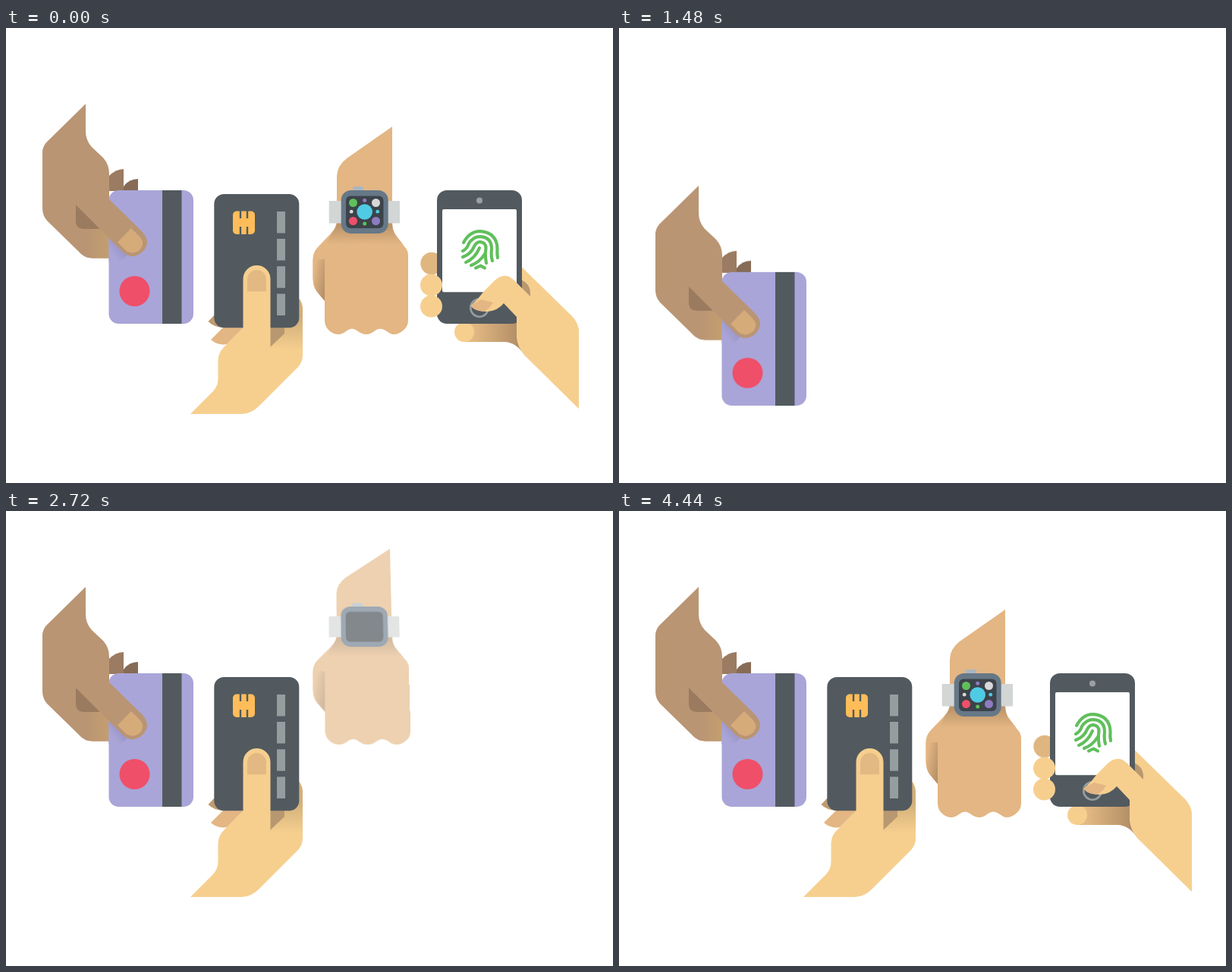
Recreate the animation shown at these times as an HTML page. Size 800 by 600 pixels, loop 4480 ms.

```html
<!DOCTYPE html>
<html lang="en">
<head>
<meta charset="utf-8">
<title>Ways to pay</title>
<style>
  html, body { margin: 0; width: 100%; height: 100%; overflow: hidden; background: #fff; }
  #stage { position: fixed; left: 0; top: 0; width: 100%; height: 100%; overflow: hidden; contain: strict; }
  svg { position: absolute; left: 0; top: 0; width: 800px; height: 600px; overflow: hidden; transform-origin: 400px 300px; }
  .dark { fill: #525a5f; }
  .tan { fill: #e3b683; }
  .skin { fill: #f6cf8f; }
  .grey { fill: #959e9f; }
  .print path { fill: none; stroke-width: 4; stroke-linecap: round; stroke-linejoin: round; }
</style>
</head>
<body>
<div id="stage">
<svg viewBox="0 0 800 600">
  <defs>
    <linearGradient id="fade" x2="0" y2="1">
      <stop stop-color="#525a5f" stop-opacity=".35"/>
      <stop offset="1" stop-color="#525a5f" stop-opacity="0"/>
    </linearGradient>
  </defs>
  <rect id="trail" x="206" y="389" width="25.5" height="110" fill="url(#fade)"/>
</svg>

<svg id="swipe" viewBox="0 0 800 600">
  <defs>
    <linearGradient id="palm1">
      <stop offset=".25" stop-color="#b99574"/>
      <stop offset="1" stop-color="#c49e6f"/>
    </linearGradient>
    <linearGradient id="shade1" x1="1" y1="0" x2="0" y2="1">
      <stop offset=".3" stop-color="#9a93c4"/>
      <stop offset=".75" stop-color="#a9a5d8"/>
    </linearGradient>
  </defs>
  <path fill="#9b7b62" d="M135 215V196Q144 186 155 186V215Z"/>
  <path fill="#866b56" d="M155 215V209Q162 199 174 199V215Z"/>
  <path fill="#b99574" d="M105 100L53 151Q48 157 48 164V238Q48 247 54 254L97 296Q104 303.500 114 303.500H136V192Q136 180 128 171L113 157Q105 148 105 136Z"/>
  <path fill="url(#palm1)" d="M97 265H136V303.500H114Q104 303.500 97 296Z"/>
  <rect x="135.500" y="214" width="111.500" height="176" rx="13" fill="#a9a5d8"/>
  <rect class="dark" x="206" y="214" width="25.500" height="176"/>
  <circle cx="169.500" cy="347" r="20" fill="#ef4f69"/>
  <path fill="url(#shade1)" d="M135.500 276L160 299Q153 309 143 308H135.500Z"/>
  <path fill="#9b7b5f" d="M92 233V254Q92 265 103 265H126Z"/>
  <path fill="#b99574" d="M92 233L153 294.500Q166 307 179 296Q193 283 179 268L135.500 225.500V192L110 200Z"/>
  <path fill="#d6ab7a" d="M147 282.500L165 264L175.500 274.500Q184 283 177.500 291.500Q168 300 158.500 294Z"/>
</svg>

<svg id="insert" viewBox="0 0 800 600">
  <defs>
    <linearGradient id="palm2" x2="0" y2="1">
      <stop offset=".4" stop-color="#d2b07b"/>
      <stop offset="1" stop-color="#f6cf8f"/>
    </linearGradient>
  </defs>
  <path class="skin" d="M386 356Q391 362 391 372V432Q391 440 385 447L334 498Q323 509 311 509H243L273 479Q279.500 472 279.500 462V438Q280 428 287 421L313 395V370H386Z"/>
  <path fill="url(#palm2)" d="M348 358H387Q391 364 391 372V425H348Z"/>
  <path fill="#b89870" d="M348 394H367V403L348 421Z"/>
  <path fill="#c09a70" d="M276 377L266.500 387Q273 394 286 395Z"/>
  <path class="tan" d="M270 411L287 394H314L291 417Q279 419 270 411Z"/>
  <rect class="dark" x="274.300" y="219" width="112" height="176.300" rx="13"/>
  <rect x="299" y="241.500" width="29" height="30.500" rx="5" fill="#ffbd5a"/>
  <rect id="chipGlow" x="299" y="241.500" width="29" height="30.500" rx="5" fill="#fff"/>
  <path stroke="#525a5f" stroke-width="2.400" d="M309 241V251M318 241V251M309 262V272.500M318 262V272.500"/>
  <path class="grey" d="M357 242h11v28.500h-11zM357 278h11v28.500h-11zM357 314.300h11v28.500h-11zM357 350.500h11v28.500h-11z"/>
  <path class="skin" d="M312.500 331a18 18 0 0 1 36 0V421L330 450L300 440L300 408L312.500 395.500Z"/>
  <path fill="#e3b983" d="M318 347.500V331.500a12.500 12.500 0 0 1 25 0V347.500Z"/>
</svg>

<svg id="wrist" viewBox="0 0 800 600">
  <defs>
    <linearGradient id="shade3" x2="0" y2="1">
      <stop offset=".2" stop-color="#bd966b"/>
      <stop offset="1" stop-color="#e3b683"/>
    </linearGradient>
    <linearGradient id="side3" x1="0" x2="1" y1="0" y2=".7">
      <stop offset=".2" stop-color="#e3b683"/>
      <stop offset="1" stop-color="#b8926a"/>
    </linearGradient>
  </defs>
  <path class="tan" d="M509 130L449 172Q436 182 436 196V252Q436 262 430 269L411 289Q404.500 296 404.500 304V329Q404.500 341 410 348L420 360V386Q420 394 427 400Q438 408 448 400Q456 393 464 400Q475 408 485 400Q493 393 502 400Q511 408 522 400Q530 394 530 386V300Q530 293 525 288L515 275Q509 268 509 258Z"/>
  <path fill="url(#side3)" d="M404.500 305H420V360L410 348Q404.500 341 404.500 329Z"/>
  <path fill="url(#shade3)" d="M436 256H509Q509 268 515 275L523 285H422L430 269Q436 262 436 256Z"/>
  <rect x="425.700" y="228" width="93.300" height="29.500" fill="#d2d6d5"/>
  <rect x="457" y="209" width="14" height="10" rx="2" fill="#a9b6c0"/>
  <rect x="441.700" y="214" width="62" height="57" rx="13" fill="#667887"/>
  <rect x="448" y="221.500" width="49.500" height="42.500" rx="6" fill="#3c434a"/>
  <g id="dots"></g>
</svg>

<svg id="touch" viewBox="0 0 800 600">
  <defs>
    <linearGradient id="palm4">
      <stop offset=".15" stop-color="#e3b983"/>
      <stop offset="1" stop-color="#ab8862"/>
    </linearGradient>
  </defs>
  <circle cx="561" cy="310.500" r="14.700" fill="#e0b680"/>
  <path fill="url(#palm4)" d="M604 388H684V432Q672 414 657 414H604Z"/>
  <circle class="skin" cx="604" cy="401" r="13"/>
  <path class="skin" d="M679 314.500L745 379Q755 389 755 402V502L684 432V380H679Z"/>
  <path id="fold" fill="#b89870" d="M679 332Q690 337 691 348V356L679 346Z"/>
  <rect class="dark" x="568" y="214" width="112" height="176" rx="13"/>
  <circle cx="624" cy="227.500" r="4" fill="#9a9fa1"/>
  <rect x="575" y="239" width="98" height="109.300" rx="2" fill="#fff"/>
  <circle cx="624" cy="369" r="11.700" fill="none" stroke="#959e9f" stroke-width="2.600"/>
  <g class="print" id="base" stroke="#d9d9d9">
    <path d="M603 283Q611 268 625 268Q647 270 647.500 291Q647 298 648 303"/>
    <path d="M602 294Q608 291 610 284Q616 275 625 275Q640 276 640 291Q639 301 641 307"/>
    <path d="M602 302Q613 298 617 288Q620 282 625 282Q633 283 632.500 291Q631 298 633 310"/>
    <path d="M606 309Q618 304 624 290"/>
    <path d="M613 313Q624 309 631 298"/>
    <path d="M619 316.500L625.500 313.500L631 316.500"/>
  </g>
  <g class="print" id="ink" stroke="#5fc05a"></g>
  <circle class="skin" cx="560.500" cy="339" r="14.500"/>
  <circle class="skin" cx="560.500" cy="367" r="14.500"/>
  <path id="thumb" class="skin"/>
  <path id="nail" class="tan"/>
</svg>
</div>

<script>
const LOOP = 4480;
const $ = id => document.getElementById(id);
const clamp = v => Math.min(1, Math.max(0, v));
const mix = (a, b, p) => a + (b - a) * p;
const span = (t, start, length) => clamp((t - start) / length);
const inOut = (u, n = 4) => u < .5 ? Math.pow(2 * u, n) / 2 : 1 - Math.pow(2 - 2 * u, n) / 2;
const backOut = (u, c = 2.8) => 1 + (c + 1) * (u - 1) ** 3 + c * (u - 1) ** 2;

// Entrances: tilt in degrees around the height pivot, shift in pixels, gain of the fade-in
const hands = [
  { el: $('swipe'),  start: 840,  time: 720, pivot: 245, tilt: 25,  from: 0,    to: 108, gain: 1.5, next: [1460, 280] },
  { el: $('insert'), start: 1602, time: 560, pivot: 300, tilt: -25, from: 75.5, to: 50,  gain: 1.5, next: [2220, 400] },
  { el: $('wrist'),  start: 2413, time: 640, pivot: 267, tilt: 25,  from: -159, to: 0,   gain: 1.5 },
  { el: $('touch'),  start: 2998, time: 500, pivot: 358, tilt: -25, from: 72,   to: 0,   gain: 2.4, side: 10 }
];

function place(hand, t, alpha) {
  const p = inOut(span(t, hand.start, hand.time));
  const q = hand.next ? inOut(span(t, ...hand.next)) : 0;
  const y = mix(mix(hand.from, hand.to, p), 0, q);
  const x = (hand.side || 0) * (1 - p);
  const tilt = hand.tilt * (1 - p);
  const off = hand.pivot - 300;
  const still = Math.abs(x) + Math.abs(y) + Math.abs(tilt) < .02;
  hand.el.style.transform = still ? 'none'
    : `perspective(1200px) translate(${x}px, ${y + off}px) rotateX(${tilt}deg) translateY(${-off}px)`;
  hand.el.style.opacity = clamp(hand.gain * p) * alpha;
  return y;
}

const NS = 'http://www.w3.org/2000/svg';
const dots = [
  [0, 0, 10.3, '#4fcbe4'],
  [-15.2, -12, 5.5, '#5fc05a'], [14.8, -12, 5.5, '#d8d8d8'],
  [-15.2, 12, 5.5, '#ef4f69'], [14.8, 12, 5.5, '#8f7cc0'],
  [0, -15.3, 2.5, '#8f7cc0'], [-17.5, -.3, 2.4, '#d8d8d8'],
  [17, -.3, 2.4, '#4fcbe4'], [0, 15.5, 2.5, '#5fc05a']
].map(([x, y, r, color]) => {
  const el = document.createElementNS(NS, 'circle');
  el.setAttribute('fill', color);
  $('dots').append(el);
  return { el, x, y, r };
});

function drawDots(t) {
  dots.forEach(({ el, x, y, r }, i) => {
    const f = Math.max(0, backOut(span(t, 2930 + i * 12, 500)));
    el.setAttribute('cx', 472.7 + x * f);
    el.setAttribute('cy', 242.5 + y * f);
    el.setAttribute('r', r * Math.min(1, f));
  });
}

// Thumb outline, resting and pressing
const rest = [630,306, 633,304, 642,305.5, 664,312, 675,314, 681,316.6, 697,333.5, 667,368, 664,346, 661,335, 648,330, 634,322];
const press = [613,366, 622,358, 630,347, 644,333, 657,321, 669,332, 691,354, 673,381, 656,363, 648,373, 634,374, 619,374];
const nailRest = [630,306, 635,305, 639,306, 659,311.5, 657,321, 655,325, 640,319.5];
const nailPress = [612,366, 620,362, 626,358, 642,362, 635,374, 627,373.5, 617,373];

function blend(a, b, p) {
  const v = a.map((n, i) => mix(n, b[i], p).toFixed(2));
  return i => v[2 * i] + ' ' + v[2 * i + 1];
}

function drawThumb(p) {
  const k = blend(rest, press, p);
  $('thumb').setAttribute('d', `M${k(0)}Q${k(1)} ${k(2)}L${k(3)}Q${k(4)} ${k(5)}L${k(6)}` +
    'L745 379Q755 389 755 402V502L684 432Q674 421 673 408' +
    `L${k(7)}L${k(8)}Q${k(9)} ${k(10)}Q${k(11)} ${k(0)}Z`);
  const n = blend(nailRest, nailPress, p);
  $('nail').setAttribute('d', `M${n(0)}Q${n(1)} ${n(2)}L${n(3)}Q${n(4)} ${n(5)}Q${n(6)} ${n(0)}Z`);
  $('fold').style.opacity = p;
}

const ink = [...$('base').children].map(line => {
  const el = line.cloneNode();
  el.setAttribute('pathLength', 1);
  $('ink').append(el);
  return el;
});

function drawInk(t) {
  ink.forEach((el, i) => {
    const p = inOut(span(t, 3900 + i * 30, 360), 2);
    el.style.strokeDasharray = p < 1 ? `${p} 2` : 'none';
    el.style.opacity = p > 0 ? 1 : 0;
  });
}

function render(now) {
  const time = now % LOOP;
  const leaving = time < 820;
  const t = leaving ? LOOP : time;
  const alpha = leaving ? 1 - inOut(span(time, 410, 400), 3) : 1;
  const [drop] = hands.map(hand => place(hand, t, alpha));

  $('trail').setAttribute('height', t > 1460 ? Math.max(0, 110 - drop) : 0);
  $('trail').setAttribute('y', 389 + drop);
  $('trail').style.opacity = 1 - span(t, 1640, 360);

  $('chipGlow').style.opacity = .65 * (1 - span(t, 2240, 320));
  drawDots(t);
  drawThumb(inOut(span(t, 3440, 440), 3));
  drawInk(t);
}

let origin;
function frame(now) {
  origin ??= now;
  render(now - origin);
  requestAnimationFrame(frame);
}
requestAnimationFrame(frame);
</script>
</body>
</html>
```
